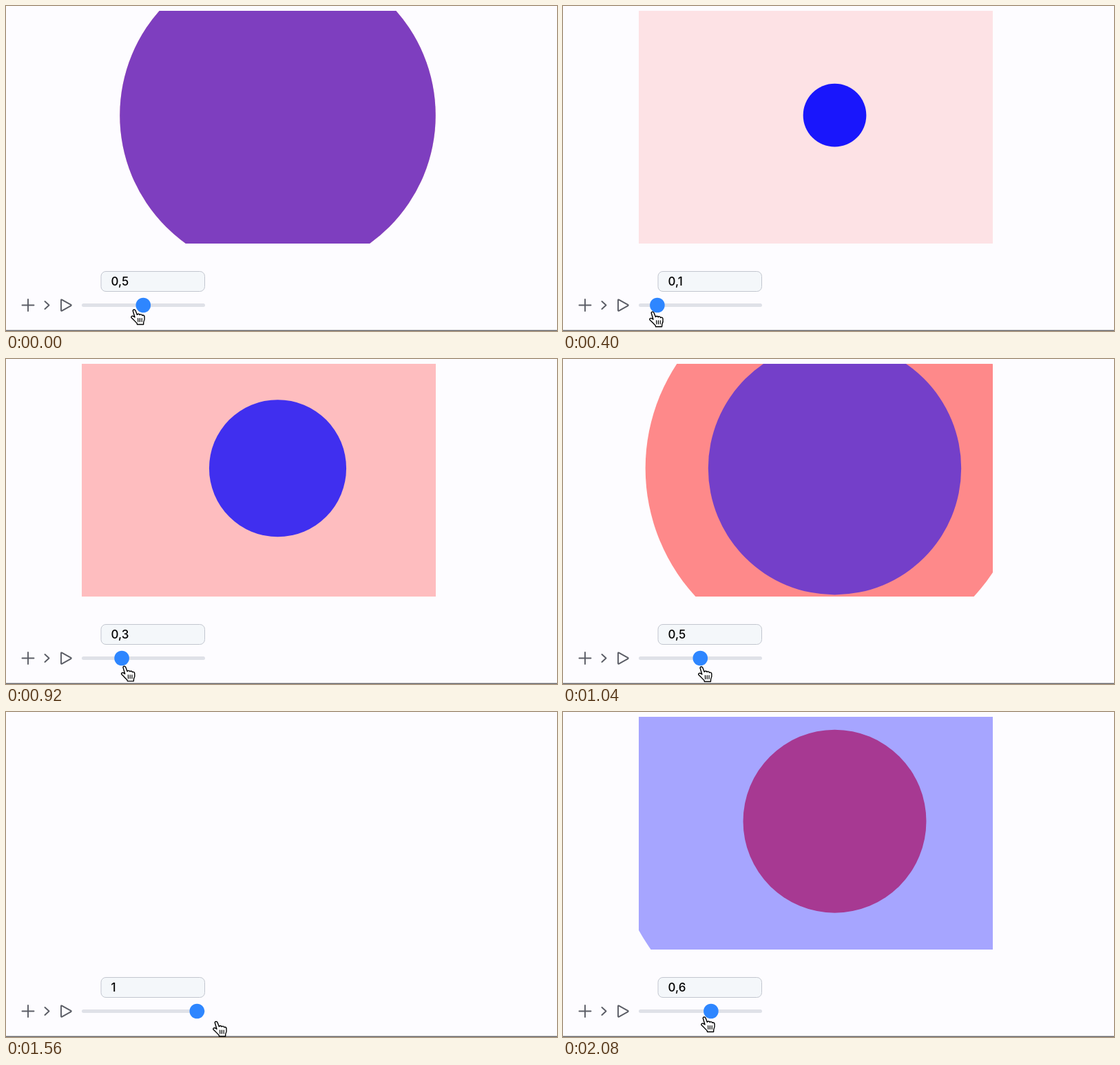
Write an HTML page that moves like this. It is 800 px wide and 472 px high and loops after 2.12 s.

```html
<!DOCTYPE html>
<html lang="en">
<head>
<meta charset="utf-8">
<title>Slider with two circles</title>
<style>
  html, body { margin: 0; width: 100%; height: 100%; overflow: hidden; background: #fdfcff; }
  svg { display: block; }
  text { font: 500 17px Inter, sans-serif; fill: #000; }
  .icon { fill: none; stroke: #5a5c65; stroke-width: 1.9; stroke-linecap: round; stroke-linejoin: round; }
</style>
</head>
<body>
<svg width="800" height="472" viewBox="0 0 800 472">
  <clipPath id="view"><rect x="110" y="7" width="514" height="338"/></clipPath>
  <g clip-path="url(#view)">
    <circle id="red" cx="394.5" cy="158.7" fill="#f00"/>
    <circle id="blue" cx="394.5" cy="158.7" fill="#00f"/>
  </g>

  <rect x="138" y="385.5" width="150.5" height="29" rx="7" fill="#f4f7fa" stroke="#c2c6cf"/>
  <text id="label" x="152.6" y="406.2"></text>

  <path class="icon" d="M23.5 434.5h17M32 426v17"/>
  <path class="icon" d="M56.5 429l6 5.5-6 5.5"/>
  <path class="icon" d="M80 427.2v14.8q0 1.2 1.2.6l13-7.2q1.2-.8 0-1.6l-13-7.2q-1.2-.6-1.2.6z"/>

  <rect x="110" y="432" width="179" height="5" rx="2.5" fill="#dfe1e8"/>
  <circle id="knob" cy="434.5" r="10.8" fill="#2e86ff"/>
  <rect y="470.6" width="800" height="1.4" fill="#66666a"/>

  <g id="hand" stroke="#000" stroke-width="1.4" stroke-linejoin="round" stroke-linecap="round">
    <path fill="#fff" d="M-1.8 1.5C-1.5-.5 1.3-.5 2 1.2L4.4 7.4C5.2 5.8 7.8 6 8.2 7.6 9.2 6.3 11.4 6.8 11.7 8.5 12.8 7.6 15 8.2 15 10.2 15.6 13.5 15.2 15.5 13.8 18L13.6 21.5H4.6L4 19.5C1.5 17.5-.5 14.5-3.6 12-5.2 10.2-3 8.4-1 9.6L1 11z"/>
    <path fill="none" stroke-width="1.2" d="M5.6 12.6l.2 5M8.4 12.6v5M11.2 12.6v5"/>
  </g>
</svg>
<script>
const LOOP = 2120, STEP = 40, SPAN = 458.5, LAG = 88;

const get = id => document.getElementById(id);
const [red, blue, label, knob, hand] = ['red', 'blue', 'label', 'knob', 'hand'].map(get);

const ramp = (t, from, to) => Math.min(1, Math.max(0, (t - from) / (to - from)));

// One drag: left to the end, right to the other end, then part of the way back
function drag(t, start, left, right, back, rightTime, lag = 0) {
  return start + left * ramp(t, 0, 500)
    + right * ramp(t - lag, 690, 690 + rightTime)
    + back * ramp(t - lag, 1760, 2080);
}

function setCircle(el, size, alpha) {
  el.setAttribute('r', SPAN * size);
  el.setAttribute('fill-opacity', alpha);
}

function draw(now) {
  const t = Math.floor(now % LOOP / STEP) * STEP;
  const slide = lag => drag(t, .5, -.5, 1, -.4, 654, lag);
  const value = Math.floor(slide(0) * 10 + .1) / 10;
  const size = slide(LAG);
  // Opacity runs ahead of the size, except near the ends
  const alpha = size + (value - size) * 2.4 * size * (1 - size);

  setCircle(red, 1 - size, alpha);
  setCircle(blue, size, 1 - alpha);
  label.textContent = String(value).replace('.', ',');
  knob.setAttribute('cx', 121.3 + 156 * value);

  const x = drag(t, 186, -70, 189, -100, 780);
  const y = drag(t, 441, 4, 4.5, -6.5, 780);
  hand.setAttribute('transform', `translate(${x} ${y})`);
}

const start = performance.now();
function tick() {
  draw(performance.now() - start);
  requestAnimationFrame(tick);
}
tick();
</script>
</body>
</html>
```
